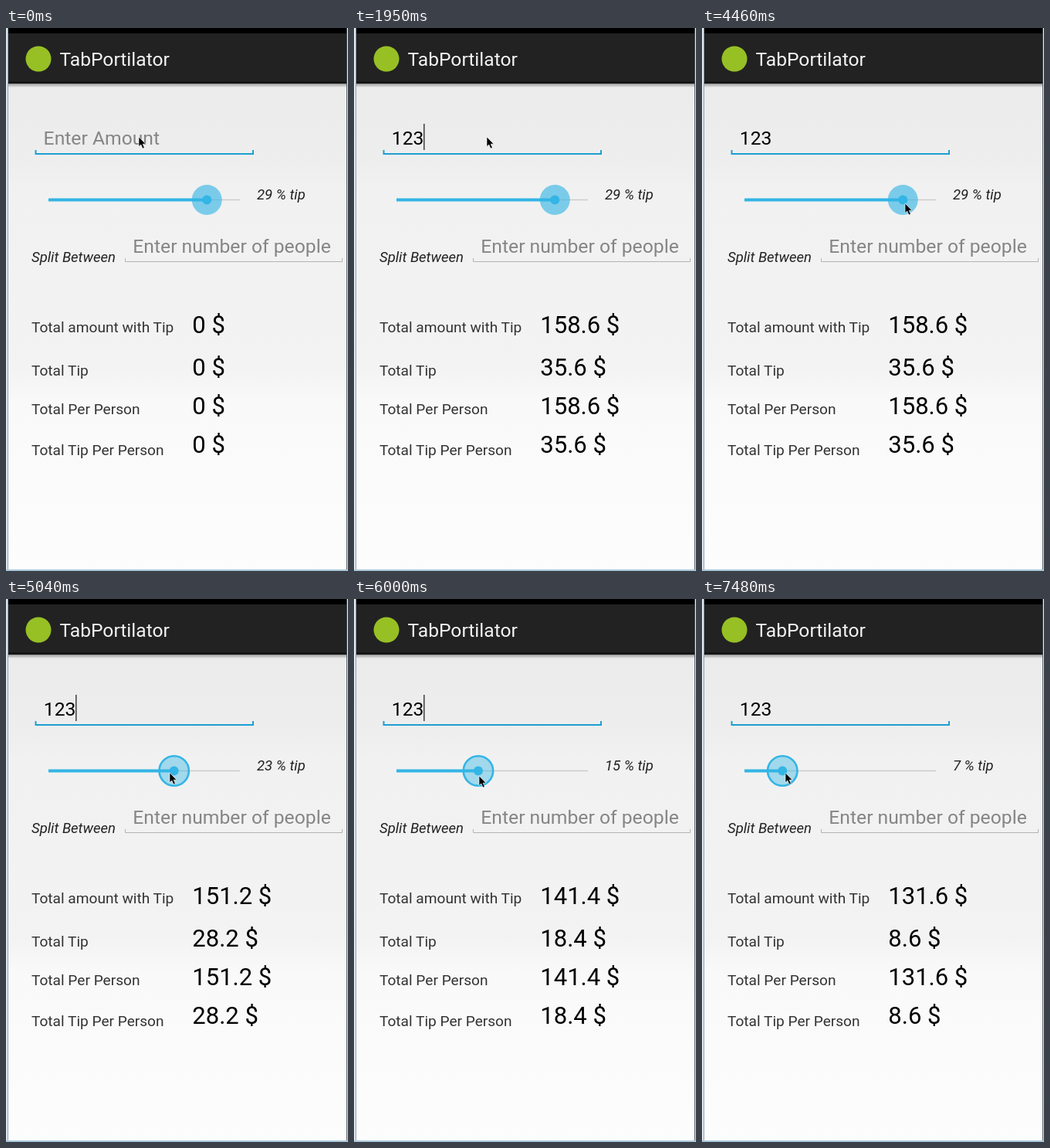
Animation, 443 px wide and 703 px high, one loop 8 s. Source, as an HTML page:

```html
<!DOCTYPE html>
<html lang="en">
<head>
<meta charset="utf-8">
<title>Tip form</title>
<style>
  html, body { margin: 0; width: 100%; height: 100%; overflow: hidden; background: #fcfcfc; }
  svg { display: block; font-family: Roboto, "Noto Sans", sans-serif; }
  .title { font-size: 24.6px; fill: #f3f3f3; }
  .field { font-size: 24.7px; fill: #000; }
  .hint { font-size: 24.7px; fill: #858585; }
  .label { font-size: 19.1px; fill: #333; }
  .note { font-size: 18.5px; font-style: italic; fill: #222; }
  .value { font-size: 31px; fill: #000; }
</style>
</head>
<body>
<svg width="443" height="703" viewBox="0 0 443 703">
  <defs>
    <linearGradient id="page" gradientUnits="userSpaceOnUse" x1="0" y1="75" x2="0" y2="703">
      <stop offset="0" stop-color="#ebebeb"/>
      <stop offset=".16" stop-color="#eeeeee"/>
      <stop offset=".21" stop-color="#f1f1f1"/>
      <stop offset=".58" stop-color="#f3f3f3"/>
      <stop offset=".65" stop-color="#f9f9f9"/>
      <stop offset="1" stop-color="#fdfdfd"/>
    </linearGradient>
    <linearGradient id="shade" x2="0" y2="1">
      <stop offset="0" stop-color="#000" stop-opacity=".35"/>
      <stop offset="1" stop-color="#000" stop-opacity="0"/>
    </linearGradient>
  </defs>

  <rect width="443" height="703" fill="url(#page)"/>
  <rect width="443" height="7" fill="#000"/>
  <rect y="7" width="443" height="65" fill="#222"/>
  <rect y="69" width="443" height="3" fill="#161616"/>
  <rect y="72" width="443" height="5" fill="url(#shade)"/>
  <circle cx="42" cy="40" r="16.5" fill="#97c024"/>
  <text class="title" x="69.5" y="48.5">TabPortilator</text>

  <path d="M38.5 158V163H320V158" fill="none" stroke="#1e9fd2" stroke-width="2"/>
  <path d="M154.5 298V302.5H435.5V298" fill="none" stroke="#b3b3b3"/>
  <text class="hint" id="amountHint" x="48.6" y="151">Enter Amount</text>
  <text class="field" id="amount" x="48.8" y="151"></text>
  <rect id="caret" y="124" width="1.4" height="34" fill="#333"/>

  <path d="M55 222.5H303" stroke="#cbcbcb" stroke-width="1.6"/>
  <path id="progress" stroke="#33b5e5" stroke-width="4"/>
  <g id="thumb">
    <circle id="halo" stroke="#33b5e5"/>
    <circle r="6" fill="#33b5e5"/>
  </g>
  <text class="note" id="percent" x="325" y="222"></text>
  <text class="note" x="33" y="303">Split Between</text>
  <text class="hint" x="164.3" y="290.5">Enter number of people</text>

  <g id="results"></g>

  <rect width="2" height="703" fill="#dbe6ee"/>
  <rect x="2" width="1" height="703" fill="#8fa3b0"/>
  <rect x="441" width="1" height="703" fill="#4f5a62"/>
  <rect x="442" width="1" height="703" fill="#dbe6ee"/>
  <rect y="701" width="443" height="2" fill="#a9c6da"/>

  <path id="pointer" d="M0 0V12.5L2.8 10L5 15L7.3 14L5.2 9.2H9Z" fill="#000" stroke="#fff" stroke-width=".6"/>
</svg>
<script>
const $ = id => document.getElementById(id);
const LOOP = 8000;

// Each entry holds from its time until the next one.
const typed = [[0, ""], [160, "1"], [550, "12"], [1000, "123"]];
const tips = [[0, 29], [4900, 27], [5040, 23], [5160, 21], [5320, 20], [5440, 19],
  [5580, 18], [5710, 15], [7090, 13], [7210, 9], [7340, 7]];
const presses = [[0, false], [4900, true], [6130, false], [7090, true]];
const pointer = [[0, 172, 141], [3060, 196, 186], [3210, 245, 240], [3610, 259, 229],
  [3760, 261, 227], [4030, 263, 227], [4900, 241, 226], [5040, 212, 225], [5160, 198, 227],
  [5320, 190, 229], [5440, 183, 230], [5580, 175, 230], [5710, 162, 229], [6130, 163, 230],
  [6270, 165, 232], [6420, 163, 234], [6690, 158, 227], [7090, 147, 226],
  [7210, 121, 225], [7340, 108, 225]];
const blinks = [160, 1540, 1950, 2510, 2930, 3480, 3900, 4460, 5040, 5580, 6000, 6570, 6950, 7480];

const at = (steps, t) => steps.findLast(step => step[0] <= t).slice(1);

const rows = [["Total amount with Tip", 394, 394.5], ["Total Tip", 449.5, 450],
  ["Total Per Person", 499.5, 500], ["Total Tip Per Person", 552.5, 550]];
$("results").innerHTML = rows.map(([label, y, valueY]) =>
  `<text class="label" x="33" y="${y}">${label}</text>
   <text class="value" x="241.3" y="${valueY}"></text>`).join("");
const values = document.querySelectorAll(".value");

const money = v => (v ? (Math.floor(v * 10 + 1e-6) / 10).toFixed(1) : "0") + " $";

function draw(t) {
  const [text] = at(typed, t), [tip] = at(tips, t), [pressed] = at(presses, t);
  const [px, py] = at(pointer, t);

  $("amount").textContent = text;
  $("amountHint").style.display = text ? "none" : "";
  $("caret").setAttribute("x", 48.8 + 13.87 * text.length - .3);
  $("caret").style.display = blinks.filter(b => b <= t).length % 2 ? "" : "none";

  const x = 54.6 + 7.09 * tip;
  $("progress").setAttribute("d", `M55 222.5H${x}`);
  $("thumb").setAttribute("transform", `translate(${x} 222.5)`);
  $("halo").setAttribute("r", pressed ? 19.2 : 19.5);
  $("halo").setAttribute("fill", `rgba(51,181,229,${pressed ? .42 : .62})`);
  $("halo").setAttribute("stroke-width", pressed ? 2.6 : 0);
  $("percent").textContent = tip + " % tip";

  const bill = +text, extra = bill * tip / 100;
  values.forEach((el, i) => el.textContent = money(i % 2 ? extra : bill + extra));
  $("pointer").setAttribute("transform", `translate(${px} ${py})`);
}

const start = performance.now();
function tick() {
  draw((performance.now() - start) % LOOP);
  requestAnimationFrame(tick);
}
tick();
</script>
</body>
</html>
```
